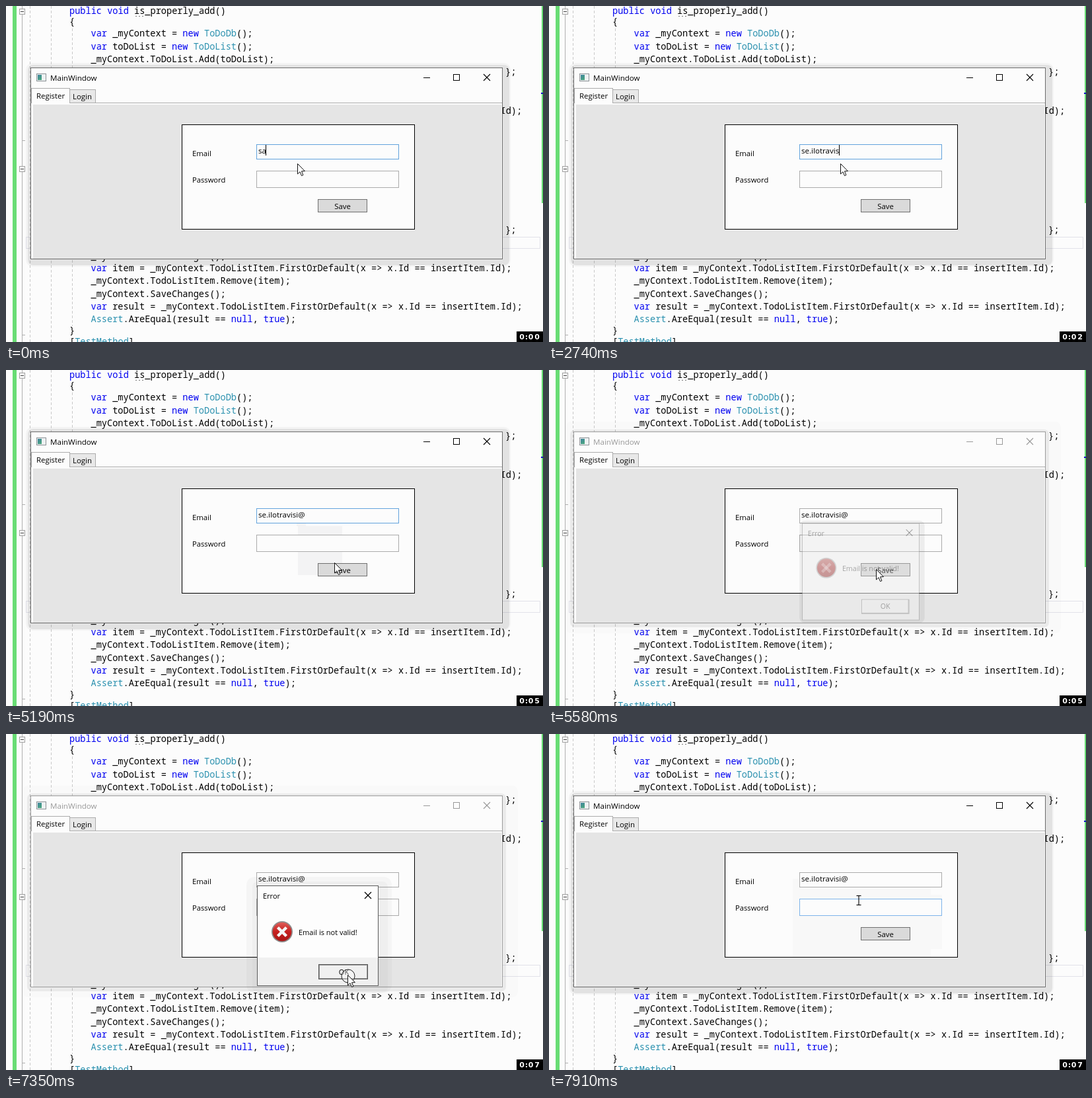
Animation, 813 px wide and 508 px high, one loop 8000 ms. Source, as an HTML page with a canvas:

```html
<!DOCTYPE html>
<html lang="en">
<head>
<meta charset="utf-8">
<title>Register form</title>
<style>
html, body { margin: 0; width: 100%; height: 100%; overflow: hidden; background: #fcfcfc; }
canvas { display: block; width: 813px; height: 508px; }
</style>
</head>
<body>
<canvas id="stage" width="813" height="508"></canvas>
<script>
const ctx = document.getElementById('stage').getContext('2d');
const LOOP = 8000;
const CODE_SIZE = 13.61;
const MONO = `${CODE_SIZE}px "Noto Sans Mono", "DejaVu Sans Mono", monospace`;
const CELL = CODE_SIZE * 0.6;
const PAPER = '#fcfcfc';
const ui = size => `${size}px "Open Sans", "Noto Sans", sans-serif`;

const CODE = [
  [96, 12, 'public void is_properly_add()'],
  [96, 28, '{'],
  [128.5, 46, 'var _myContext = new ToDoDb();'],
  [128.5, 66, 'var toDoList = new ToDoList();'],
  [128.5, 85, '_myContext.ToDoList.Add(toDoList);'],
  [405, 104, '{'],
  [756, 104, '};'],
  [748.5, 163, 'Id);'],
  [756, 343, '};'],
  [128.5, 383, '_myContext.SaveChanges();'],
  [128.5, 401, 'var item = _myContext.TodoListItem.FirstOrDefault(x => x.Id == insertItem.Id);'],
  [128.5, 420, '_myContext.TodoListItem.Remove(item);'],
  [128.5, 440, '_myContext.SaveChanges();'],
  [128.5, 459, 'var result = _myContext.TodoListItem.FirstOrDefault(x => x.Id == insertItem.Id);'],
  [128.5, 478, 'Assert.AreEqual(result == null, true);'],
  [96, 495, '}'],
  [96, 512, '[TestMethod]']
];
const TOKENS = /(\b(?:public|void|var|new|null|true)\b|ToDoDb|(?<=new )ToDoList|Assert|TestMethod)/;
const KEYWORD = /^(public|void|var|new|null|true)$/;
const TYPE = /^(ToDoDb|ToDoList|Assert|TestMethod)$/;

const EMAIL = 'se.ilotravisi@';
// Moments at which the address grows by one character, from the third on.
const KEYS = [1450, 1580, 1710, 1840, 1970, 2100, 2230, 2360, 2490, 2740, 2860, 3290];
const TICKS = [1070, 2100, 3140, 4130, 5040, 6260, 7230];
// [time, caret shown]
const CARET = [[0, 1], [550, 0], [960, 1], [3850, 0], [4280, 1], [4840, 0]];
// [time, x, y]
const POINTER = [
  [0, 441, 238], [5190, 497, 291], [5340, 497, 299], [5470, 495, 301],
  [6000, 510, 319], [6160, 533, 343], [6260, 534, 350], [6400, 528, 359],
  [6540, 521, 363], [6680, 517, 364], [7620, 508, 337], [7770, 484, 281], [7910, 469, 251]
];
// [time, opacity, scale]
const DIALOG = [
  [0, 0, 1], [5580, 0.32, 0.967], [5720, 0.85, 0.99], [5850, 1, 1],
  [7480, 0.6, 0.98], [7620, 0.15, 0.95], [7770, 0, 1]
];

const passed = (times, t) => times.filter(k => k <= t).length;
const at = (steps, t) => steps[passed(steps.map(s => s[0]), t) - 1];

function fill(x, y, w, h, color) {
  ctx.fillStyle = color;
  ctx.fillRect(x, y, w, h);
}

function box(x, y, w, h, edge, inside) {
  if (inside) fill(x, y, w, h, inside);
  ctx.strokeStyle = edge;
  ctx.lineWidth = 1;
  ctx.strokeRect(x + 0.5, y + 0.5, w - 1, h - 1);
}

function line(color, width, ...pts) {
  ctx.strokeStyle = color;
  ctx.lineWidth = width;
  ctx.beginPath();
  for (let i = 0; i < pts.length; i += 2) ctx.lineTo(pts[i], pts[i + 1]);
  ctx.stroke();
}

function cross(x, y, r, color, width) {
  line(color, width, x - r, y - r, x + r, y + r);
  line(color, width, x + r, y - r, x - r, y + r);
}

function disc(x, y, r, color) {
  ctx.beginPath();
  ctx.arc(x, y, r, 0, 7);
  ctx.fillStyle = color;
  ctx.fill();
}

function label(str, x, y, size = 11.4, color = '#000', align = 'left') {
  ctx.font = ui(size);
  ctx.textAlign = align;
  ctx.fillStyle = color;
  ctx.fillText(str, x, y);
}

function shade(x, y, w, h, r, alpha) {
  ctx.fillStyle = `rgba(0,0,0,${alpha})`;
  ctx.beginPath();
  ctx.roundRect(x, y, w, h, r);
  ctx.fill();
}

function fold(y) {
  box(20, y, 9, 9, '#a0a0a0', PAPER);
  fill(22, y + 4, 5, 1, '#444');
}

function drawEditor() {
  fill(0, 0, 813, 508, PAPER);
  fill(10, 0, 6, 508, '#68dd74');
  fill(24, 0, 1, 508, '#b0b0b0');
  fill(24, 203, 5, 1, '#b0b0b0');
  fill(24, 497, 5, 1, '#b0b0b0');
  fold(4);
  fold(242);
  ctx.setLineDash([4, 3]);
  line('#c9c9c9', 1, 36.5, 0, 36.5, 508);
  line('#c9c9c9', 1, 68.5, 0, 68.5, 508);
  line('#c9c9c9', 1, 100.5, 34, 100.5, 484);
  ctx.setLineDash([]);
  box(30, 349, 779, 18, '#e2e2ea');
  fill(811, 0, 2, 298, '#68dd74');
  fill(810, 131, 3, 2, '#1414c8');

  ctx.font = MONO;
  ctx.textAlign = 'left';
  for (const [x, y, text] of CODE) {
    let col = 0;
    for (const part of text.split(TOKENS)) {
      ctx.fillStyle = KEYWORD.test(part) ? '#0000f0' : TYPE.test(part) ? '#2b91af' : '#000';
      ctx.fillText(part, x + col * CELL, y);
      col += part.length;
    }
  }
  for (let i = 0; i < 3; i++) fill(196 + i * 5, 15, 2, 1, '#777');
}

function drawFrame(active) {
  if (active) {
    shade(30, 86, 734, 308, 10, 0.03);
    shade(33, 89, 729, 303, 8, 0.075);
  } else {
    shade(25, 78, 750, 320, 8, 0.012);
    shade(32, 90, 725, 299, 7, 0.06);
  }
  box(37, 93, 715, 290, active ? '#6d6d6d' : '#9c9c9c', PAPER);

  box(46, 102, 15, 12, '#8c9296', '#eef1f2');
  const tint = ctx.createLinearGradient(47, 104, 54, 113);
  tint.addColorStop(0, '#3b7fa0');
  tint.addColorStop(1, '#4fae78');
  fill(48, 104, 6, 8, tint);

  const ink = active ? '#000' : '#999';
  label('MainWindow', 67, 113, 11.6, ink);
  fill(632, 108, 10, 1, ink);
  box(677, 103, 10, 10, ink);
  cross(728, 108, 5, ink, 1.1);

  fill(41, 149, 709, 233, '#e5e5e5');
  fill(38, 146, 713, 1, '#acacac');
  box(96, 126, 40, 21, '#acacac', '#e8e8e8');
  box(38, 124, 59, 23, '#acacac', PAPER);
  fill(39, 146, 57, 2, PAPER);
  label('Register', 46, 140);
  label('Login', 101, 141);
}

function drawForm(t) {
  box(266, 179, 353, 159, '#000', PAPER);
  if (t >= 5190 && t < 5580) {
    fill(442, 236, 67, 74, '#f3f3f4');
    fill(440, 232, 14, 4, '#f3f3f4');
  }
  if (t >= 7770) {
    fill(369, 219, 209, 118, '#f8f8f8');
    fill(578, 243, 17, 82, '#f8f8f8');
  }
  label('Email', 282, 227, 11.3);
  label('Password', 282, 267, 11.2);
  box(379, 209, 216, 23, t < 5580 ? '#62a3dc' : '#ababab', PAPER);
  box(379, 249, 216, 26, t >= 7910 ? '#7eb4ea' : '#ababab', PAPER);
  box(472, 292, 75, 20, '#707070', '#dadada');
  label('Save', 509.5, 307, 11.3, '#000', 'center');

  let typed = EMAIL.slice(0, 2 + passed(KEYS, t));
  if (t < 960) typed = 'sa';
  else if (t < 1180) typed = 's';
  label(typed, 382, 223, 11.6);
  if (at(CARET, t)[1]) {
    const x = Math.round(382 + ctx.measureText(typed).width - 0.6);
    fill(x, 210, 1, 16, '#000');
  }
}

function drawDialog(t) {
  const [, alpha, scale] = at(DIALOG, t);
  if (!alpha) return;
  ctx.save();
  ctx.translate(472, 305);
  ctx.scale(scale, scale);
  ctx.translate(-472, -305);
  if (alpha < 1) {
    shade(376, 225, 196, 160, 8, 0.06);
  } else {
    shade(364, 216, 220, 175, 12, 0.028);
    shade(373, 223, 205, 168, 8, 0.025);
  }
  ctx.globalAlpha = alpha;
  box(380, 229, 184, 152, '#5c5c5c', '#fdfdfd');
  fill(381, 338, 182, 42, '#f0f0f0');
  label('Error', 389, 249, 11);
  cross(548, 244, 5, '#000', 1.2);

  const red = ctx.createLinearGradient(0, 284, 0, 314);
  red.addColorStop(0, '#e0605c');
  red.addColorStop(0.5, '#c5201f');
  red.addColorStop(1, '#a81616');
  disc(418, 299, 16, '#8d8d8d');
  disc(418, 299, 14.3, red);
  cross(418, 299, 6.5, '#f6f6f6', 4.5);
  label('Email is not valid!', 443, 304, 11);

  const pressed = t >= 7230 && t < 7480;
  box(473, 348, 75, 23, '#555', '#f0f0f0');
  if (pressed) {
    box(474, 349, 73, 21, '#999');
  } else {
    line('#fff', 1, 474.5, 369, 474.5, 349.5, 546, 349.5);
    line('#777', 1, 474, 369.5, 546.5, 369.5, 546.5, 349);
  }
  const nudge = pressed ? 1 : 0;
  label('OK', 510.5 + nudge, 363 + nudge, 11, '#000', 'center');
  ctx.restore();
}

function drawPointer(t) {
  const [, x, y] = at(POINTER, t);
  if (t >= 7910) {
    line('#111', 1.2, x, y - 6, x, y + 7);
    line('#111', 1.2, x - 3.5, y - 6.5, x + 3.5, y - 6.5);
    line('#111', 1.2, x - 3.5, y + 7.5, x + 3.5, y + 7.5);
    return;
  }
  if (t >= 7350 && t < 7480) {
    disc(518, 366, 10, 'rgba(255,255,255,0.35)');
    ctx.strokeStyle = '#222';
    ctx.lineWidth = 1;
    ctx.stroke();
  }
  ctx.save();
  ctx.translate(x, y);
  ctx.beginPath();
  ctx.moveTo(0.5, 0.5);
  for (const [px, py] of [[0.5, 16], [4, 12.7], [6.5, 18.6], [8.9, 17.6], [6.5, 11.8], [11.4, 11.6]]) {
    ctx.lineTo(px, py);
  }
  ctx.closePath();
  ctx.fillStyle = '#fff';
  ctx.fill();
  ctx.strokeStyle = '#111';
  ctx.lineWidth = 1;
  ctx.stroke();
  ctx.restore();
}

function drawClock(t) {
  fill(773, 492, 40, 16, '#000');
  ctx.font = 'bold 11px "DejaVu Sans", sans-serif';
  ctx.textAlign = 'center';
  ctx.fillStyle = '#fff';
  const chars = '0:0' + passed(TICKS, t);
  [781, 788, 794.5, 804].forEach((x, i) => ctx.fillText(chars[i], x, 503.5));
}

function draw(t) {
  drawEditor();
  drawFrame(t < 5580 || t >= 7620);
  drawForm(t);
  drawDialog(t);
  drawPointer(t);
  drawClock(t);
}

const start = performance.now();
function tick() {
  draw((performance.now() - start) % LOOP);
  requestAnimationFrame(tick);
}
tick();
</script>
</body>
</html>
```
